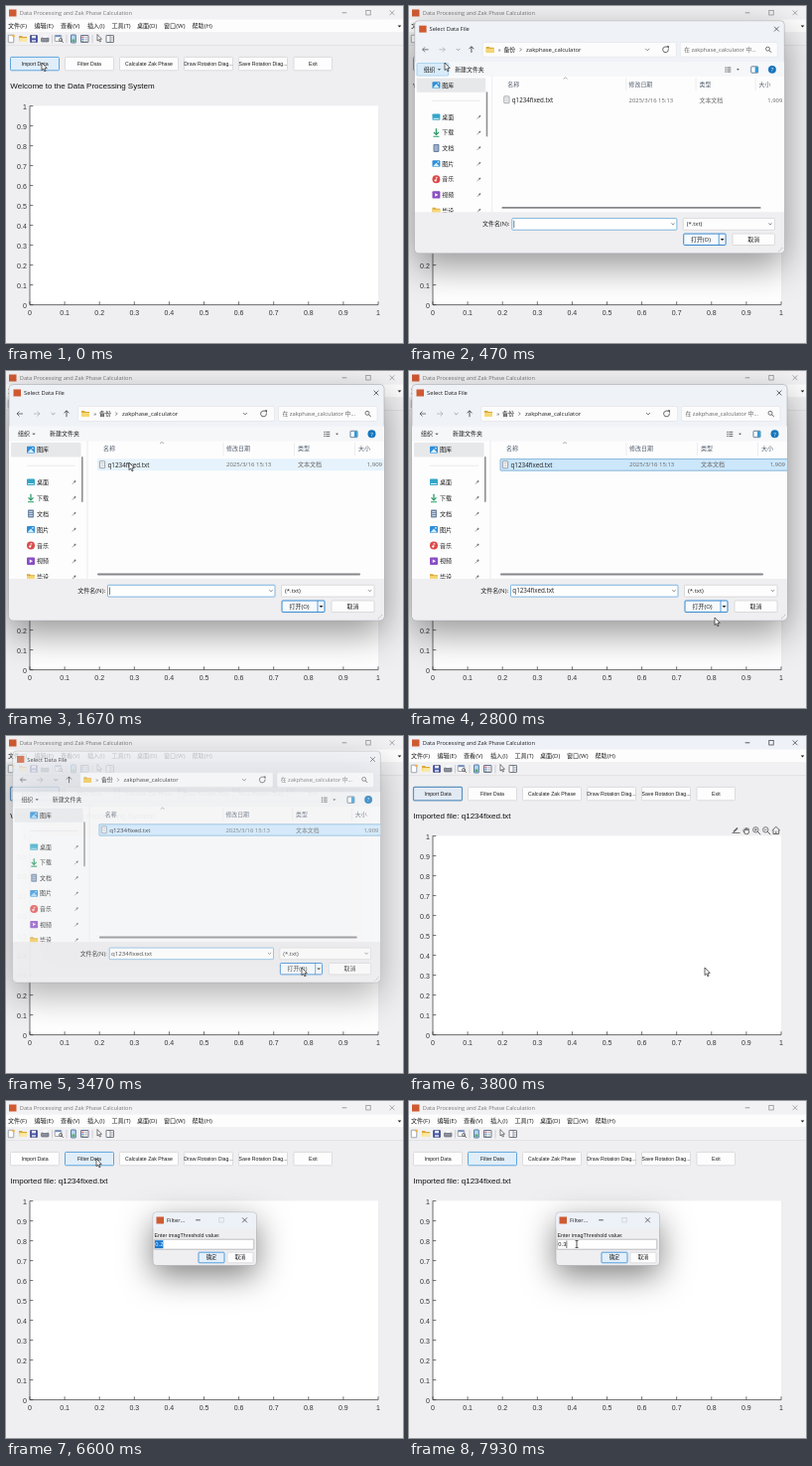
Animation, 400 px wide and 339 px high, one loop 8000 ms. Source, as an HTML page with a canvas:

```html
<!DOCTYPE html>
<html lang="en">
<head>
<meta charset="utf-8">
<title>Data Processing</title>
<style>
  html, body { margin: 0; width: 100%; height: 100%; overflow: hidden; background: #efeef0; }
  canvas { display: block; width: 400px; height: 339px; }
</style>
</head>
<body>
<canvas id="stage"></canvas>
<script>
const LOOP = 8000, W = 400, H = 339;
const UI = '"Open Sans", "Noto Sans CJK SC", "Noto Sans CJK", sans-serif';
const ARIAL = '"Liberation Sans", "Noto Sans CJK SC", "Noto Sans CJK", sans-serif';
const BG = '#efeef0', INK = '#1c1c1c', BLUE = '#2f86cf', LOGO = '#cf5a32';

const canvas = document.getElementById('stage');
const dpr = window.devicePixelRatio || 1;
canvas.width = W * dpr;
canvas.height = H * dpr;
const c = canvas.getContext('2d');

// Event times in ms
const T = {
  open: 400, hover: 1350, select: 1900, close: 3420, label: 3580,
  leave: 4780, enter: 5180, ask: 5800, typed: [7640, 7750, 7860]
};
// Cursor stops: start, end, x, y
const STOPS = [
  [0, 0, 36, 57], [950, 1450, 124, 92], [2050, 2580, 308, 248],
  [2900, 3200, 298, 233], [4450, 5300, 91, 58], [6980, 7500, 169, 144]
];

const clamp = v => Math.max(0, Math.min(1, v));
const smooth = v => v * v * (3 - 2 * v);
const easeOut = v => 1 - (1 - v) ** 3;
const blinkOn = ms => Math.floor(ms / 530) % 2 === 0;

function rect(x, y, w, h, fill) {
  c.fillStyle = fill;
  c.fillRect(x, y, w, h);
}

function box(x, y, w, h, r, fill, stroke, lw = 0.7) {
  c.beginPath();
  c.roundRect(x, y, w, h, r);
  if (fill) { c.fillStyle = fill; c.fill(); }
  if (stroke) { c.strokeStyle = stroke; c.lineWidth = lw; c.stroke(); }
}

function line(color, lw, ...pts) {
  c.beginPath();
  for (let i = 0; i < pts.length; i += 2) c.lineTo(pts[i], pts[i + 1]);
  c.strokeStyle = color;
  c.lineWidth = lw;
  c.stroke();
}

function poly(fill, ...pts) {
  c.beginPath();
  for (let i = 0; i < pts.length; i += 2) c.lineTo(pts[i], pts[i + 1]);
  c.closePath();
  c.fillStyle = fill;
  c.fill();
}

function ring(x, y, r, color, lw = 0.8, a = 0, b = Math.PI * 2) {
  c.beginPath();
  c.arc(x, y, r, a, b);
  c.strokeStyle = color;
  c.lineWidth = lw;
  c.stroke();
}

function disc(x, y, r, fill) {
  c.beginPath();
  c.arc(x, y, r, 0, Math.PI * 2);
  c.fillStyle = fill;
  c.fill();
}

// y is the middle of the capitals
function text(s, x, y, size, color = INK, align = 'left', font = UI) {
  c.font = `${size}px ${font}`;
  c.textAlign = align;
  c.fillStyle = color;
  c.fillText(s, x, y + size * 0.36);
}

const chevron = (x, y, s, color = '#555') => line(color, 0.7, x - s, y - s / 2, x, y + s / 2, x + s, y - s / 2);
const triangle = (x, y, s, color = INK) => poly(color, x - s, y - s / 2, x + s, y - s / 2, x, y + s / 2);

function closeMark(x, y, s, color) {
  line(color, 0.7, x - s, y - s, x + s, y + s);
  line(color, 0.7, x - s, y + s, x + s, y - s);
}

function controls(xs, y, color, maxColor = color) {
  line(color, 0.8, xs[0] - 2.3, y, xs[0] + 2.3, y);
  c.strokeStyle = maxColor;
  c.lineWidth = 0.7;
  c.strokeRect(xs[1] - 2.2, y - 2.2, 4.4, 4.4);
  closeMark(xs[2], y, 2.4, color);
}

function folder(x, y) {
  poly('#d9a93a', x - 4, y - 3, x - 1, y - 3, x, y - 2, x + 4, y - 2, x + 4, y + 3, x - 4, y + 3);
  rect(x - 4, y - 1, 8, 4, '#f7d774');
}

function magnifier(x, y, r, color, sign) {
  ring(x, y, r, color, 0.8);
  line(color, 1, x + r * 0.7, y + r * 0.7, x + r * 1.8, y + r * 1.8);
  if (sign) line(color, 0.7, x - 1.4, y, x + 1.4, y);
  if (sign === '+') line(color, 0.7, x, y - 1.4, x, y + 1.4);
}

function page(x, y, w, h) {
  box(x - w / 2, y - h / 2, w, h, 0.4, '#fff', '#77808c', 0.7);
}

function toolbar() {
  const y = 33;
  page(5, y, 5.5, 7.5);
  disc(7.5, 30, 1.3, '#f0b23a');
  folder(17, y);
  poly('#fae9a8', 14.5, 32.5, 22, 32.5, 20.5, 36, 13, 36);
  box(24.5, 29.5, 7, 7, 0.5, '#4655a8', '#2d376f', 0.6);
  rect(26, 29.8, 4, 2.6, '#e8ebf6');
  rect(26, 34, 4, 2.4, '#bcc5e2');
  box(35.5, 32, 7.5, 4, 0.8, '#8b909b', '#555b66', 0.6);
  poly('#f4f6fb', 37, 32, 38, 28.8, 42, 28.8, 41.5, 32);
  page(52.5, 32.5, 6.5, 6);
  rect(49.5, 29.5, 6, 1.7, '#6f8fc0');
  magnifier(55, 34, 1.5, '#555');
  box(65.5, 29, 4.8, 8, 0.5, '#b5d5ee', '#35608f', 0.8);
  rect(66.5, 33.5, 2.8, 2.5, '#5aa86a');
  box(75.5, 29.5, 7.5, 7, 0.3, '#fff', '#44507c', 0.8);
  for (let i = 0; i < 3; i++) {
    rect(76.4, 30.6 + i * 2, 2, 1.2, ['#c74848', '#3e67c0', '#44935a'][i]);
    line('#777', 0.6, 79.2, 31.2 + i * 2, 82, 31.2 + i * 2);
  }
  arrow(92, 28.6, 0.85);
  box(101, 29.5, 7.5, 7, 0.3, '#fff', '#555e6a', 0.8);
  line('#555e6a', 0.7, 105, 29.5, 105, 36.5);
  for (let i = 0; i < 3; i++) line('#7d8792', 0.6, 105.5, 31.4 + i * 1.7, 108, 31.4 + i * 1.7);
  for (const x of [46.5, 61, 87]) line('#c2c2c4', 0.7, x, 29, x, 37.5);
}

function button(x, w, label, state) {
  const look = {
    hot: ['#e0eefa', '#4f9edb', 0.9],
    focus: ['#e2eaf4', '#5d93c0', 1.2]
  }[state] || ['#fdfdfd', '#d2d2d4', 0.7];
  box(x + 0.5, 51.4, w - 1, 13.4, 1, ...look);
  text(label, x + w / 2, 58, 5.2, INK, 'center', ARIAL);
}

function axesTools() {
  const k = '#5c5c5c', y = 95;
  line(k, 1.6, 327, 96.5, 331, 92.5);
  line(k, 0.8, 325.5, 97.5, 333.5, 97.5);
  box(337.8, 94, 4.6, 4.6, 1.6, null, k, 0.9);
  for (let i = 0; i < 4; i++) line(k, 0.8, 338 + i * 1.4, 95, 338 + i * 1.4, 92 + (i % 3 ? 0 : 0.8));
  line(k, 0.9, 336.3, 94.7, 338, 97);
  magnifier(349.3, 94.3, 2.7, k, '+');
  magnifier(359.3, 94.3, 2.7, k, '-');
  line(k, 0.9, 365.8, y, 369.8, 91.3, 373.8, y);
  line(k, 0.9, 367, 94.5, 367, 98.5, 372.6, 98.5, 372.6, 94.5);
  line(k, 0.9, 369.8, 98.5, 369.8, 95.8);
}

function axes() {
  const k = '#333', x0 = 24, y0 = 300.6, dx = 35.1, dy = 20;
  rect(x0, 100.4, 351, 200.2, '#fff');
  line(k, 0.7, x0, 100.4, x0, y0, 375, y0);
  for (let i = 0; i <= 10; i++) {
    const x = x0 + i * dx, y = y0 - i * dy, label = String(i / 10);
    line(k, 0.7, x, y0, x, y0 - 3.3);
    line(k, 0.7, x0, y, x0 + 3.3, y);
    text(label, x, 308.3, 7, k, 'center', ARIAL);
    text(label, 20.8, y + 0.4, 7, k, 'right', ARIAL);
  }
}

function mainWindow(t) {
  const active = t >= T.close + 100 && t < T.ask;
  rect(0, 0, W, H, BG);
  rect(0, 0, W, 13.5, active ? '#eef1f8' : '#f2f2f4');
  rect(3, 3.5, 7.5, 7, LOGO);
  text('Data Processing and Zak Phase Calculation', 13.8, 7, 5.7, active ? '#202020' : '#777');
  controls([341, 365, 389], 6.8, active ? '#333' : '#888');

  rect(0, 13.5, W, 13, '#fdfdfd');
  const menus = ['文件(F)', '编辑(E)', '查看(V)', '插入(I)', '工具(T)', '桌面(D)', '窗口(W)', '帮助(H)'];
  const at = [2, 28.5, 55, 82, 106.5, 132, 159, 187.5];
  menus.forEach((m, i) => text(m, at[i], 20.2, 6.1));
  triangle(396.5, 20.5, 1.8);
  rect(0, 26.5, W, 13, '#f1f0f2');
  line('#d8d8da', 0.6, 0, 39.6, W, 39.6);
  toolbar();

  const importing = t < T.open + 100 ? 'hot' : t < 5500 ? 'focus' : '';
  button(4, 50, 'Import Data', importing);
  button(59, 50, 'Filter Data', t >= T.enter ? 'hot' : '');
  button(114, 60, 'Calculate Zak Phase');
  button(179, 50, 'Draw Rotation Diag...');
  button(234, 50, 'Save Rotation Diag...');
  button(289.5, 39.5, 'Exit');

  const status = t < T.label ? 'Welcome to the Data Processing System' : 'Imported file: q1234fixed.txt';
  text(status, 4.3, 80.5, 8, '#111', 'left', ARIAL);
  axes();
  if (t >= T.label + 60 && t < T.leave) axesTools();
}

function panel(x, y, w, h, r, blur, dy, alpha, fill) {
  c.save();
  c.shadowColor = `rgba(0,0,0,${alpha})`;
  c.shadowBlur = blur * dpr;
  c.shadowOffsetY = dy * dpr;
  box(x, y, w, h, r, fill);
  c.restore();
  box(x, y, w, h, r, null, '#a9a9ad', 0.6);
}

function sideIcon(kind, x, y) {
  if (kind === 0 || kind === 4) {
    box(x - 4, y - 3.5, 8, 7, 1, '#2f8fd8');
    poly('#d5effc', x - 3.5, y + 3, x, y - 1, x + 3.5, y + 3);
    disc(x + 2, y - 1.6, 0.8, '#fff');
  } else if (kind === 1) {
    box(x - 4, y - 3.2, 8, 6.4, 0.8, '#35a6c8');
    rect(x - 3, y + 1.2, 6, 1, '#d6f0f7');
  } else if (kind === 2) {
    line('#2b9c68', 1.3, x, y - 4, x, y + 2);
    line('#2b9c68', 1.3, x - 2.5, y - 0.3, x, y + 2.2, x + 2.5, y - 0.3);
    line('#2b9c68', 1.1, x - 3, y + 4, x + 3, y + 4);
  } else if (kind === 3) {
    box(x - 3, y - 4, 6, 8, 0.8, '#6d86a8');
    for (let i = -1; i < 2; i++) line('#fff', 0.7, x - 1.8, y + i * 2, x + 1.8, y + i * 2);
  } else if (kind === 5) {
    disc(x, y, 4, '#dc4a4a');
    disc(x - 0.8, y + 1.2, 1.1, '#fff');
    line('#fff', 0.7, x, y + 1.2, x, y - 2, x + 1.5, y - 1.4);
  } else if (kind === 6) {
    box(x - 4, y - 3.7, 8, 7.4, 1, '#8a4fc4');
    poly('#fff', x - 1.2, y - 1.8, x + 2, y, x - 1.2, y + 1.8);
  } else folder(x, y);
}

function sidebar() {
  box(5, 72, 70.5, 14.5, 1, '#e7e8ea');
  sideIcon(0, 25, 79.3);
  text('图库', 31, 79.3, 6);
  line('#dedee0', 0.6, 21, 95.3, 70, 95.3);
  ['桌面', '下载', '文档', '图片', '音乐', '视频', '毕设'].forEach((name, i) => {
    const y = 111.8 + i * 15.9;
    sideIcon(i + 1, 25, y);
    text(name, 31, y, 6);
    line('#777', 1.5, 68.6, y + 0.2, 70.2, y - 1.4);
    line('#777', 0.7, 66.8, y + 2, 68.6, y + 0.2);
  });
  box(76, 86, 1.6, 46, 0.8, '#909094');
}

function fileList(t) {
  line('#e3e3e5', 0.6, 82, 70, 82, 209);
  for (const x of [219, 290.5, 351.5]) line('#e2e2e4', 0.6, x, 72, x, 85);
  line('#777', 0.6, 155, 73, 157, 71.5, 159, 73);
  const heads = [['名称', 98], ['修改日期', 222], ['类型', 294], ['大小', 355]];
  for (const [s, x] of heads) text(s, x, 78.3, 6, '#4f5b6c');

  if (t >= T.select) box(92, 88.6, 292, 11.6, 0.5, '#cce7fb', '#71a9cf', 0.8);
  else if (t >= T.hover) rect(92, 88.3, 292, 12, '#e6f3fc');
  page(97, 94.2, 5.2, 7);
  for (let i = -1; i < 2; i++) line('#999', 0.5, 95.4, 94.2 + i * 1.7, 98.6, 94.2 + i * 1.7);
  text('q1234fixed.txt', 102.5, 94.3, 6.3);
  text('2025/3/16 15:13', 222, 94.3, 6, '#666');
  text('文本文档', 294, 94.3, 6, '#666');
  text('1,909', 379, 94.3, 6, '#666', 'right');
  box(92, 203.6, 265, 1.8, 0.9, '#87878b');
}

function navBar() {
  rect(7.5, 18.5, 7.5, 7, LOGO);
  text('Select Data File', 18, 22.3, 5.8);
  closeMark(373, 22, 2.4, '#333');

  const arrowRow = (x, d, k) => {
    line(k, 0.8, x - 3, 43, x + 3, 43);
    line(k, 0.8, x + d * 0.5, 40.5, x + d * 3, 43, x + d * 0.5, 45.5);
  };
  arrowRow(14, -1, '#555');
  arrowRow(31, 1, '#b0b0b4');
  chevron(47.5, 43, 1.8, '#777');
  line('#333', 0.8, 61, 46.2, 61, 40);
  line('#333', 0.8, 58.5, 42.4, 61, 39.8, 63.5, 42.4);

  box(72.5, 35.5, 198, 15, 1.5, '#fcfcfd', '#dfe1e5', 0.6);
  folder(80, 43);
  text('»', 88.3, 42.6, 6, '#555');
  text('备份', 94, 43, 6);
  line('#555', 0.7, 110.5, 41.3, 112.2, 43, 110.5, 44.7);
  text('zakphase_calculator', 117, 43, 6);
  chevron(241, 43, 2);
  ring(259.5, 43, 2.9, '#444', 0.8, -0.2, 5.2);
  poly('#444', 260.5, 39.2, 263.2, 39.5, 262.5, 42.2);

  box(274.5, 35.5, 99.5, 15, 1.5, '#fcfcfd', '#dfe1e5', 0.6);
  text('在 zakphase_calculator 中...', 278.5, 43, 5.8, '#666');
  magnifier(364, 42.3, 2, '#555');
}

function commandBar(t) {
  rect(3, 55.5, 378, 14.8, '#f6f7f9');
  if (t < 1020) box(5.3, 56.8, 32, 13, 0.8, '#d8ebf9', '#8cc2e8', 0.7);
  text('组织', 12, 63.3, 6);
  triangle(28, 63.5, 1.7, '#444');
  text('新建文件夹', 44, 63.3, 6);
  for (let i = -1; i < 2; i++) {
    rect(320.3, 63 + i * 2.1, 1.2, 1, '#444');
    line('#444', 0.8, 322.3, 63.5 + i * 2.1, 326.3, 63.5 + i * 2.1);
  }
  triangle(333.5, 63.5, 1.5, '#444');
  box(347, 60.3, 7, 6.4, 0.6, '#fff', '#3e627e', 0.8);
  rect(351, 60.6, 2.8, 5.8, '#2f9bd8');
  disc(368.5, 63.3, 4, '#1675bd');
  text('?', 368.5, 63.4, 6, '#fff', 'center');
}

function footer(t) {
  rect(3, 209, 378, 39, BG);
  rect(6, 246, 372, 4.3, BG);
  text('文件名(N):', 100, 221, 6, INK, 'right');
  box(102.5, 215.3, 168.5, 11.8, 0.8, '#fff', '#62a6d8', 0.8);
  if (t >= T.select) text('q1234fixed.txt', 104.3, 221, 6.3);
  else if (blinkOn(t - T.open)) line(INK, 0.6, 104.5, 217.5, 104.5, 225);
  chevron(267, 221, 1.6);
  box(277.5, 215.3, 93.5, 11.8, 0.8, '#fdfdfd', '#cfcfd2', 0.7);
  text('(*.txt)', 281, 221, 6);
  chevron(366.5, 221, 1.6);
  box(278, 231, 43, 11.6, 1, '#f6fafd', BLUE, 1);
  line(BLUE, 0.8, 314, 231, 314, 242.6);
  text('打开(O)', 295.5, 236.8, 6, INK, 'center');
  triangle(317.5, 237, 2);
  box(328, 231, 43, 11.6, 1, '#fdfdfd', '#cfcfd2', 0.7);
  text('取消', 349.5, 236.8, 6, INK, 'center');
  for (let i = 0; i < 3; i++) rect(375 + i * 1.6, 248.4 - i * 1.6, 0.9, 0.9, '#aaa');
}

// Grows or shrinks a drawing about a point while it fades
function popup(t, start, end, cx, cy, draw) {
  if (t < start || t > end + 160) return;
  const shown = easeOut(clamp((t - start) / 150));
  const gone = smooth(clamp((t - end) / 160));
  const s = 1 - 0.1 * (1 - shown) - 0.08 * gone;
  c.save();
  c.globalAlpha = clamp((t - start + 25) / 75) * (1 - gone);
  c.translate(cx, cy);
  c.scale(s, s);
  c.translate(-cx, -cy);
  draw(t);
  c.restore();
}

function fileDialog(t) {
  panel(3, 13.5, 378, 237.5, 4, 36, 13, 0.42, '#eff2f7');
  c.save();
  c.beginPath();
  c.roundRect(3, 13.5, 378, 237.5, 4);
  c.clip();
  navBar();
  commandBar(t);
  rect(3, 70.3, 378, 139, '#fdfdfd');
  sidebar();
  fileList(t);
  footer(t);
  c.restore();
}

function filterDialog(t) {
  panel(148, 112, 104.5, 53.5, 3.5, 32, 10, 0.5, BG);
  box(148.3, 112.3, 103.9, 16, [3.5, 3.5, 0, 0], '#edf1f8');
  rect(151.5, 116.5, 7.5, 7, LOGO);
  text('Filter...', 162, 120.2, 5.8);
  controls([193.5, 217, 240.5], 119.8, '#333', '#c9ccd2');
  text('Enter imagThreshold value:', 149.5, 135.3, 5.4, INK, 'left', ARIAL);
  box(149.3, 139.2, 100.5, 10, 0.4, '#fff', '#a4a4a8', 0.7);

  const count = T.typed.filter(k => t >= k).length;
  if (count) {
    text('0.3'.slice(0, count), 150.3, 144.3, 5.8, INK, 'left', ARIAL);
    const x = 150.8 + c.measureText('0.3'.slice(0, count)).width;
    line(INK, 0.6, x, 140.5, x, 148);
  } else {
    rect(150, 140.2, 8.4, 8, '#1878d0');
    text('0.2', 150.3, 144.3, 5.8, '#fff', 'left', ARIAL);
  }
  box(194, 152.2, 26, 10.6, 0.8, '#e3effa', '#3f92d6', 0.9);
  text('确定', 207, 157.4, 5.3, INK, 'center');
  box(223, 152.2, 26, 10.6, 0.8, '#fdfdfd', '#d2d2d4', 0.7);
  text('取消', 236, 157.4, 5.3, INK, 'center');
}

function arrow(x, y, s = 1) {
  c.save();
  c.translate(x, y);
  c.scale(s, s);
  poly('#fff', 0, 0, 0, 7.6, 1.7, 6.1, 2.9, 8.8, 4.1, 8.2, 2.9, 5.7, 5.2, 5.5);
  c.strokeStyle = '#222';
  c.lineWidth = 0.7;
  c.stroke();
  c.restore();
}

function cursor(t) {
  let [, , x, y] = STOPS[0];
  for (const [a, b, tx, ty] of STOPS.slice(1)) {
    const k = smooth(clamp((t - a) / (b - a)));
    x += (tx - x) * k;
    y += (ty - y) * k;
  }
  const overInput = t > T.ask && x > 149 && x < 250 && y > 139 && y < 149;
  if (!overInput) return arrow(x, y);
  line('#222', 0.8, x, y - 3.5, x, y + 3.5);
  for (const d of [-3.5, 3.5]) line('#222', 0.7, x - 1.5, y + d, x + 1.5, y + d);
}

function frame(now) {
  const t = now % LOOP;
  c.setTransform(dpr, 0, 0, dpr, 0, 0);
  mainWindow(t);
  popup(t, T.open, T.close, 192, 100, fileDialog);
  popup(t, T.ask, LOOP, 200, 139, filterDialog);
  cursor(t);
}

const begin = performance.now();
function tick() {
  frame(performance.now() - begin);
  requestAnimationFrame(tick);
}
tick();
</script>
</body>
</html>
```
